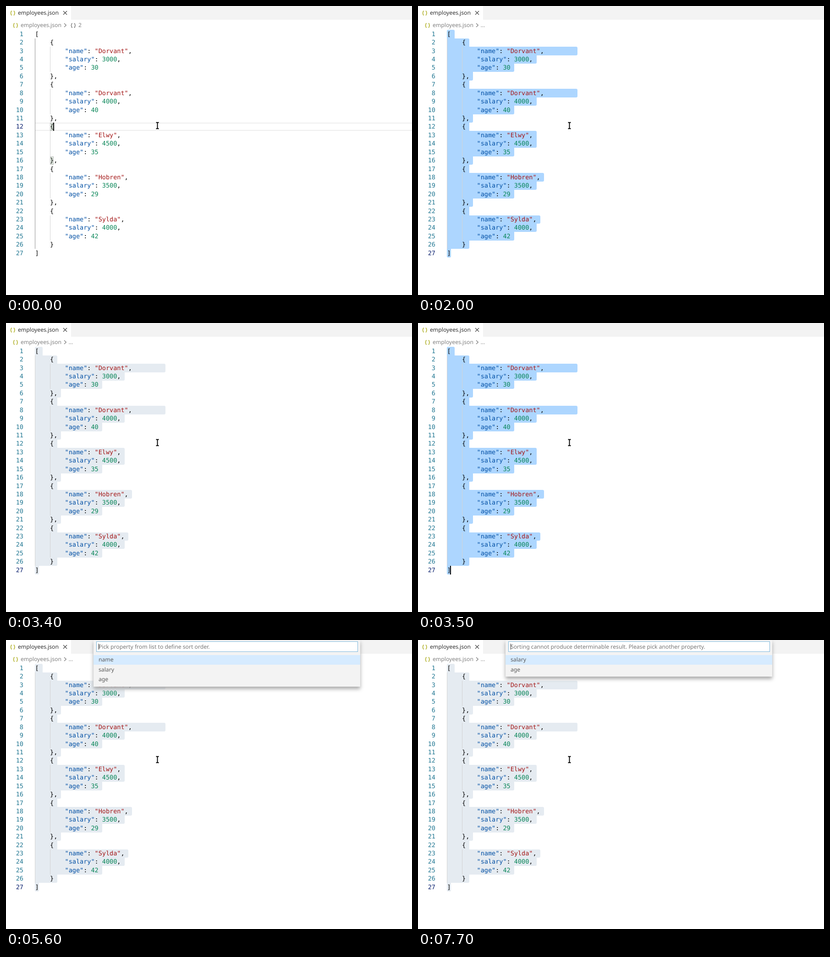
Recreate the animation shown at these times as an HTML page. Size 886x632 px, loop 8 s.

```html
<!DOCTYPE html>
<html lang="en">
<head>
<meta charset="utf-8">
<title>Sort JSON array</title>
<style>
html, body { margin: 0; width: 100%; height: 100%; overflow: hidden; background: #fff; }
#stage { position: relative; width: 886px; height: 632px; overflow: hidden; font: 12.2px "Noto Sans", sans-serif; color: #616161; text-rendering: geometricPrecision; }
#stage div, #stage svg { position: absolute; box-sizing: border-box; white-space: pre; }
svg { overflow: visible; fill: none; }
.code { font: 13.5px/18.42px "DejaVu Sans Mono", monospace; color: #000; }
.key { color: #0451a5; }
.str { color: #a31515; }
.num { color: #098658; }
.label { line-height: 20px; }
.match { border: 1px solid #b9b9b9; background: rgba(0, 100, 0, .1); }
.picker { background: #f3f3f3; box-shadow: 0 5px 8px #a8a8a8; }
.input { background: #fff; border: 1px solid #7db8dd; }
#stage .keys { display: flex; align-items: center; gap: 3px; right: 17px; height: 21px; font-size: 10.4px; color: #555; }
.keys b { font-weight: normal; line-height: 13px; padding: 0 4.5px; border: 1px solid rgba(204, 204, 204, .6); border-bottom-color: rgba(187, 187, 187, .7); border-radius: 3px; background: rgba(221, 221, 221, .4); }
.keys i { width: 4px; }
#stage .group { right: 17px; color: #0066bf; line-height: 21px; }
</style>
</head>
<body>
<div id="stage"></div>
<script>
const LOOP = 8000, LEFT = 63.5, TOP = 52.3, CHAR = 8.127, ROW = 18.42, PICK_ROW = 21.32;
const stage = document.getElementById('stage');

const people = [['Dorvant', 3000, 30], ['Dorvant', 4000, 40], ['Elwy', 4500, 35], ['Hobren', 3500, 29], ['Sylda', 4000, 42]];
const lines = ['['];
people.forEach(([name, salary, age], i) => {
  const trailing = i < 2 ? ' '.repeat(8) : '';
  lines.push('    {', `        "name": "${name}",${trailing}`, `        "salary": ${salary},`,
    `        "age": ${age}`, i < 4 ? '    },' : '    }');
});
lines.push(']');

// Each command: label, then key chords separated by spaces
const commands = `Sort JSON array
Format Document|Ctrl+Shift+I
Sort JSON array custom
Close Window|Ctrl+X K
Preferences: Color Theme|Ctrl+K Ctrl+T
Add Cursor Above
Add Cursor Below|Shift+Alt+DownArrow
Add Cursors To Bottom
Add Cursors to Line Ends|Shift+Alt+I
Add Cursors To Top
Add Line Comment|Ctrl+K Ctrl+C
Add Selection To Next Find Match|Ctrl+Alt+N
Add Selection To Previous Find Match
Back|Ctrl+Alt+-
Change All Occurrences|Ctrl+F2
Change End of Line Sequence
Change File Encoding`.split('\n');

const pickers = {
  palette: { text: '>', items: commands },
  property: { text: 'Pick property from list to define sort order.', items: ['name', 'salary', 'age'] },
  retry: { text: 'Sorting cannot produce determinable result. Please pick another property.', items: ['salary', 'age'] }
};

// Positions are [line, column]
const cues = [
  [0, { from: [12, 5], to: [12, 5], caret: 1, symbol: 1 }],
  [100, { caret: 0 }],
  [400, { to: [16, 4], caret: 1 }],
  [800, { from: [12, 4], to: [16, 5] }],
  [900, { to: [16, 6] }],
  [1100, { from: [12, 0] }],
  [1200, { symbol: 0 }],
  [1400, { from: [1, 1], to: [27, 0] }],
  [1600, { from: [1, 0], to: [27, 1] }],
  [2000, { caret: 0 }],
  [2400, { picker: 'palette', dim: 1, caret: 1, thumb: .1 }],
  [2500, { thumb: .4 }],
  [3000, { caret: 0 }],
  [3400, { picker: null }],
  [3500, { dim: 0, caret: 1 }],
  [3600, { picker: 'property', dim: 1 }],
  [4100, { caret: 0 }],
  [4700, { caret: 1 }],
  [5000, { caret: 0 }],
  [5600, { caret: 1 }],
  [6200, { caret: 0 }],
  [6600, { picker: 'retry', caret: 1 }],
  [7200, { caret: 0 }],
  [7700, { caret: 1 }]
];

const box = (x, y, w, h, style, cls = '', html = '') =>
  `<div class="${cls}" style="left:${x}px;top:${y}px;width:${w}px;height:${h}px;${style}">${html}</div>`;
const label = (x, middle, text, color) =>
  `<div class="label" style="left:${x}px;top:${middle - 10}px;color:${color}">${text}</div>`;
const path = (x, y, d, attrs) =>
  `<svg width="1" height="1" style="left:${x}px;top:${y}px"><path d="${d}" ${attrs}/></svg>`;
const braces = (x, y, color, weight = 1.6) => path(x, y,
  'M4 0Q2 0 2 2V3Q2 4.5 .5 4.5Q2 4.5 2 6V7Q2 9 4 9M7.5 0Q9.5 0 9.5 2V3Q9.5 4.5 11 4.5Q9.5 4.5 9.5 6V7Q9.5 9 7.5 9',
  `stroke="${color}" stroke-width="${weight}"`);

const lineTop = n => Math.round(TOP + (n - 1) * ROW);
const lineHeight = n => lineTop(n + 1) - lineTop(n);
const colX = col => LEFT + col * CHAR;

function header(s) {
  return box(0, 0, 886, 30, 'background:#f3f3f3') + box(0, 0, 142, 30, 'background:#fff') +
    braces(8.5, 10.5, '#b7b73b') + label(26, 14.5, 'employees.json', '#333') +
    path(125, 11, 'M0 0L8 8M8 0L0 8', 'stroke="#424242" stroke-width="1.1"') +
    braces(14.5, 37.5, '#b7b73b') + label(32, 41.5, 'employees.json', '#818181') +
    path(126.5, 38, 'M0 0L4.3 4L0 8', 'stroke="#717171" stroke-width="1.1"') +
    (s.symbol ? braces(141, 37.5, '#555', 1.1) + label(158, 41.5, '2', '#818181') : label(136.5, 41.5, '…', '#818181'));
}

function selection({ from, to, dim }) {
  const end = n => n < from[0] || n > to[0] ? 0 : Math.round(n === to[0] ? colX(to[1]) : colX(lines[n - 1].length + 1));
  let html = '';
  for (let n = from[0]; n <= to[0]; n++) {
    const first = n === from[0], last = n === to[0];
    const x = Math.floor(first ? colX(from[1]) : LEFT), right = end(n);
    const radius = [first, end(n - 1) < right, end(n + 1) < right, last].map(r => r ? '3px' : '0').join(' ');
    html += box(x, lineTop(n), right - x, lineHeight(n), `background:${dim ? '#e5ebf1' : '#add6ff'};border-radius:${radius}`);
  }
  return html;
}

function currentLine() {
  const matched = n => box(96, lineTop(n), 8, lineHeight(n), '', 'match');
  return box(64, lineTop(12), 822, lineHeight(12), 'border:solid #eee;border-width:2px 0') + matched(12) + matched(16);
}

function guides(active) {
  const guide = (x, first, after, color) =>
    box(x, lineTop(first), 1, lineTop(after) - lineTop(first), `background:${color}`);
  return guide(63, 2, 27, active ? '#939393' : '#d3d3d3') +
    people.map((_, i) => guide(96, 3 + i * 5, 6 + i * 5, '#d3d3d3')).join('');
}

const colorize = line => line.replace(/("\w+")(?=:)|("\w+")|(\d+)/g,
  (token, key, str) => `<span class="${key ? 'key' : str ? 'str' : 'num'}">${token}</span>`);

const codeLines = active => lines.map((line, i) => {
  const y = TOP + .5 + i * ROW;
  return box(0, y, 38, ROW, `text-align:right;color:${i + 1 === active ? '#0b216f' : '#237893'}`, 'code', i + 1) +
    box(LEFT, y, 400, ROW, '', 'code', colorize(line));
}).join('');

const chords = keys => '<div class="keys">' + keys.split(' ').map(chord =>
  chord.split('+').map(key => `<b>${key}</b>`).join('<span>+</span>')).join('<i></i>') + '</div>';

function picker(s) {
  const { text, items } = pickers[s.picker], palette = s.picker === 'palette';
  const top = palette ? 33.6 : 32.6, middle = palette ? 15.5 : 14.5;
  let html = box(6, 3, 571, palette ? 24 : 23, '', 'input') + label(11, middle, text, palette ? '#616161' : '#767676');
  if (s.caret) html += box(palette ? 18 : 11, palette ? 9 : 8, 1, 13, 'background:#333');
  items.forEach((item, i) => {
    const [name, keys] = item.split('|');
    const group = palette && { 0: 'recently used', 5: 'other commands' }[i];
    const fill = i === 0 ? '#d6ebff' : palette && i === 10 ? '#e8e8e8' : 'none';
    const rule = palette && i === 5 ? ';border-top:1px solid #ccced0' : '';
    html += box(0, top + i * PICK_ROW, 582, PICK_ROW, `background:${fill}${rule}`, '',
      label(11, 10.6, name, '#5a5a5a') + (keys ? chords(keys) : '') + (group ? `<div class="group">${group}</div>` : ''));
  });
  if (palette) html += box(573, 34, 9, 20, `background:rgba(100,100,100,${s.thumb})`);
  return box(191, 0, 582, top + items.length * PICK_ROW + 5, '', 'picker', html);
}

function pointer(hand) {
  if (hand) return path(323, 259,
    'M5 9V2Q5 .6 6.3 .6Q7.6 .6 7.6 2V6Q9.5 5 10.4 6.5Q12.3 5.8 13 7.2Q15.5 6.8 15.5 9V11.5L14 15.3H7L1.2 10.2Q.6 8.6 2.2 8.2Q3.5 8.1 5 9.7Z',
    'fill="#fff" stroke="#111" stroke-width="1.5" stroke-linejoin="round"');
  const beam = 'M.5 .8H2.5Q3.5 .8 3.5 1.8Q3.5 .8 4.5 .8H6.5M3.5 1.5V13.5M.5 14.2H2.5Q3.5 14.2 3.5 13.2Q3.5 14.2 4.5 14.2H6.5';
  return path(327, 254, beam, 'stroke="#fff" stroke-width="4"') + path(327, 254, beam, 'stroke="#000" stroke-width="1.9"');
}

function render(s) {
  const [line, col] = s.to;
  const empty = s.from.join() === s.to.join();
  stage.innerHTML = header(s) + (empty ? currentLine() : selection(s)) + guides(empty) + codeLines(line) +
    (s.caret && !s.picker ? box(Math.floor(colX(col) - 1), lineTop(line), 2, lineHeight(line), 'background:#000') : '') +
    (s.picker ? picker(s) : '') + pointer(s.picker === 'palette');
}

let shown = 0;
function tick() {
  const time = performance.now() % LOOP;
  const count = cues.filter(([at]) => at <= time).length;
  if (count !== shown) {
    shown = count;
    render(Object.assign({}, ...cues.slice(0, count).map(cue => cue[1])));
  }
  requestAnimationFrame(tick);
}
tick();
</script>
</body>
</html>
```
